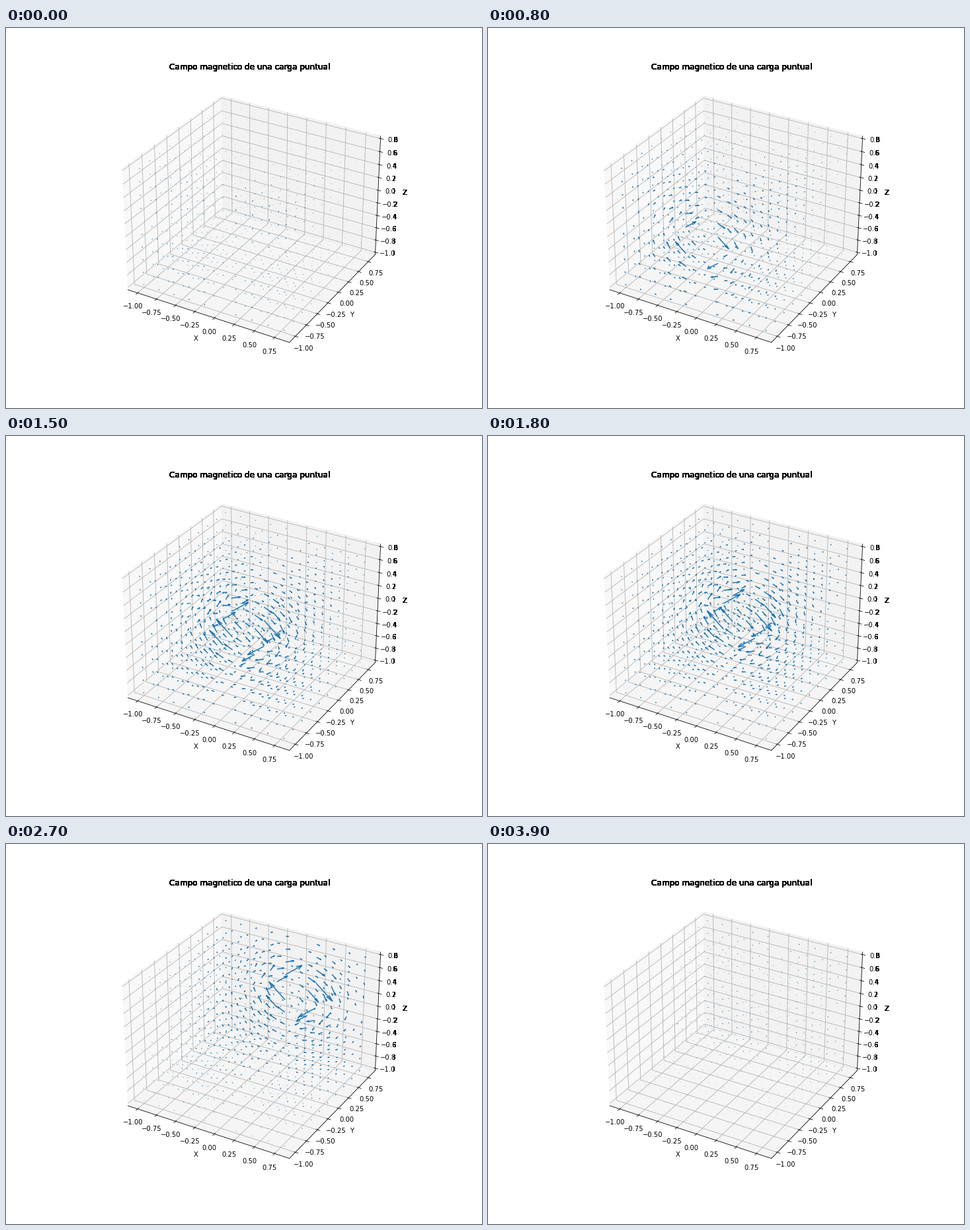
Write a matplotlib script that moves like this. It is 720 by 576 pixels and loops after 4000 ms.

```python
import numpy as np
import matplotlib.pyplot as plt
from matplotlib.animation import FuncAnimation
from matplotlib.transforms import Bbox

FRAMES = 40
STRENGTH = 0.025
COPIES = 40

plt.rcParams["font.family"] = "DejaVu Sans"
fig = plt.figure(figsize=(10, 8), dpi=72, facecolor="white")
fig.subplots_adjust(left=0.125, right=0.9, bottom=0.125, top=0.88)
ax = fig.add_subplot(projection="3d")


def padded(low, high, margin):
    """Limits with a relative margin, plus the 1/48 pane border."""
    pad = (high - low) * margin
    low, high = low - pad, high + pad
    border = (high - low) / 48
    return low - border, high + border


ax.view_init(elev=30, azim=-60)
ax.set_xticks(np.arange(-1, 1, 0.25))
ax.set_yticks(np.arange(-1, 1, 0.25))
ax.set_zticks(np.arange(-5, 5) / 5)
ax.set_xlim(*padded(-1, 0.8, 0.05))
ax.set_ylim(*padded(-1, 0.8, 0.05))
ax.set_zlim(*padded(-1, 0.8, 0))
ax.set_xlabel("X")
ax.set_ylabel("Y")
ax.set_zlabel("Z")
ax.set_title("Campo magnetico de una carga puntual", y=1.0)
ax.title.set_y(1.0)  # 3D axes lower their title by default


def harden(label, clip=None):
    """Overprint a text so that its soft edges turn black."""
    x, y = label.get_position()
    for _ in range(COPIES):
        copy = fig.text(x, y, label.get_text(), transform=label.get_transform(),
                        ha=label.get_ha(), va=label.get_va(),
                        rotation=label.get_rotation(),
                        rotation_mode=label.get_rotation_mode(),
                        fontsize=label.get_fontsize())
        if clip is not None:
            copy.set_clip_box(clip)
            copy.set_clip_on(True)


# Text outside the square axes area has hard edges.
fig.canvas.draw()
outside = Bbox.from_extents(ax.bbox.x1, 0, 720, 576)
harden(ax.title)
harden(ax.zaxis.label)
for tick in ax.zaxis.get_major_ticks():
    harden(tick.label1, outside)

# The field is undefined on the planes x = 0 and z = 0.
nodes = np.arange(-5, 5) / 5
off_axis = nodes[nodes != 0]
x, y, z = (g.ravel() for g in np.meshgrid(off_axis, nodes, off_axis))

charge_path = np.linspace(-2, 2, FRAMES)
arrows = None


def draw(frame):
    """Field v x r / r^3 of a charge moving along the y axis."""
    global arrows
    if arrows is not None:
        arrows.remove()
    r = np.sqrt(x**2 + (y - charge_path[frame])**2 + z**2)
    k = STRENGTH / r**3
    arrows = ax.quiver(x, y, z, k * z, 0 * k, -k * x, color="#1f77b4",
                       linewidth=1.5, arrow_length_ratio=0.3)
    return [arrows]


anim = FuncAnimation(fig, draw, frames=FRAMES, init_func=lambda: draw(0),
                     interval=100, repeat=True, repeat_delay=0, blit=False)
plt.show()
```
